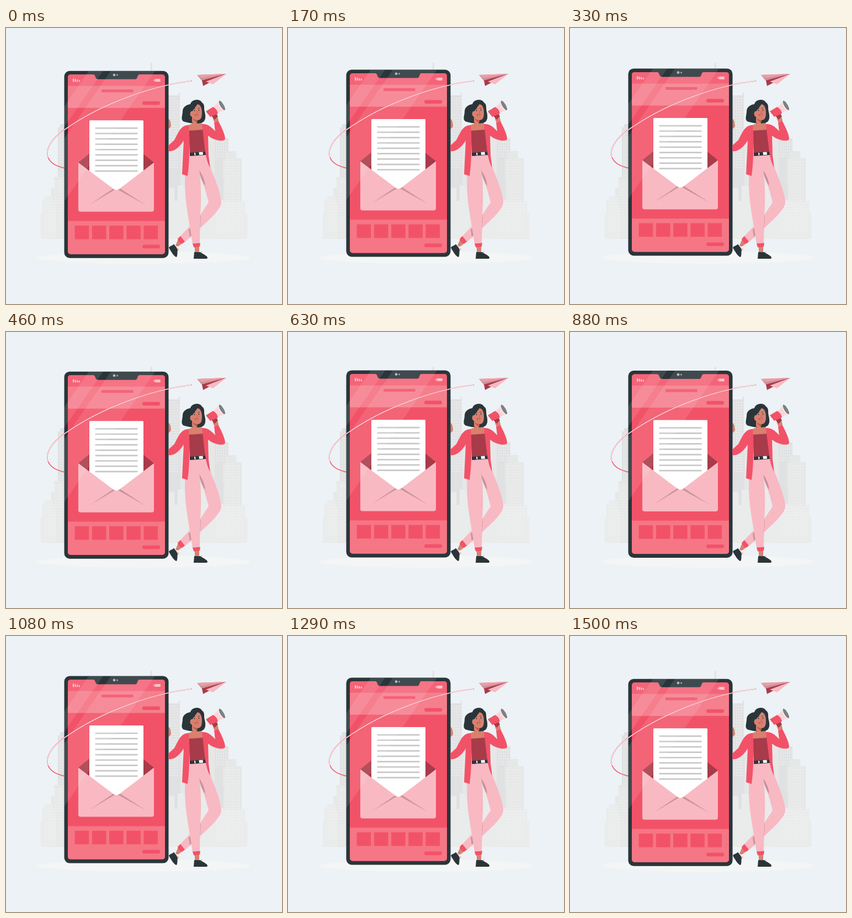
Recreate the animation shown at these times as an HTML page. Size 500 px wide and 500 px high, loop 1.54 s.

```html
<!DOCTYPE html>
<html lang="en">
<head>
<meta charset="utf-8">
<title>Newsletter</title>
<style>
html, body { margin: 0; height: 100%; overflow: hidden; background: #ecf2f5; }
svg { display: block; width: 100vw; height: 100vh; }
.red { fill: #f25268; }
.deep { fill: #a83b49; }
.pink { fill: #f8b9c2; }
.shade { fill: #c9939a; }
.dark { fill: #2a353a; }
.skin { fill: #d9806f; }
</style>
</head>
<body>
<svg viewBox="0 0 500 500">
  <defs>
    <pattern id="windows" width="4" height="5" patternUnits="userSpaceOnUse">
      <rect x="1" y="1" width="2" height="3" fill="#f2f2f2" opacity=".6"/>
    </pattern>
    <clipPath id="case"><rect x="105.5" y="78" width="189" height="339" rx="10"/></clipPath>
    <clipPath id="screen"><rect x="112" y="84.5" width="176" height="325.5" rx="5"/></clipPath>
  </defs>

  <ellipse cx="250" cy="416" rx="193" ry="11" fill="#f4f5f5"/>

  <g id="city">
    <path fill="#e0e1e2" d="M262 63h2.5v20h-2.5zM94 180h4v-6h8v130H94zM294 122h19v-5h2v66h63v17h25v112H294z"/>
    <path fill="#e6e7e7" d="M82 290h6v-20h18v112H82zM316 190h62v150h-62zM393 236h6v-13h18v13h10v146h-34z"/>
    <path fill="#eaebeb" d="M63 382v-46h3v-26h5v-5h15v10h4v67zM294 382V290h11v23h6v-28h67v29h55v22h4v46z"/>
    <path fill="#e0e1e2" d="M305 283h6v30h-6zM389 272h5v40h-5z"/>
    <path fill="url(#windows)" d="M96 182h10v88H96zM296 124h18v130h-18zM380 204h22v30h-22zM86 274h20v106H86zM397 238h28v90h-28zM70 310h18v60H70zM380 314h50v58h-50z"/>
  </g>

  <path class="skin" d="M290 164q7 0 8 6l1 8q-3 6-9 5z"/>
  <path fill="none" stroke="#f25268" stroke-width="1.5" d="M76 234C80 245 92 251 107 254"/>

  <g id="phone">
    <rect class="dark" x="105.5" y="78" width="189" height="339" rx="10"/>
    <g clip-path="url(#screen)">
      <path class="red" d="M112 84h176v327H112z"/>
      <path fill="#f46478" d="M112 84h176v21H112z"/>
      <path fill="#f57f8d" d="M112 105h176v40H112z"/>
      <path fill="#f57685" d="M112 349.8h176V411H112z"/>
    </g>
    <path class="dark" d="M158 84q3 1 4 5 1 4 5 4h67q3 0 4-4 1-4 4-5z"/>
    <g class="red">
      <rect x="173" y="111.5" width="57.5" height="5.2" rx="1"/>
      <rect x="247" y="133" width="32" height="6.5" rx="3.2"/>
      <rect x="247" y="393" width="32" height="6.5" rx="3.2"/>
      <g id="tiles"></g>
    </g>
    <path fill="#fac4cb" d="M121 92h2.3v5.7H121zM124.7 92.8h2.2v4.9h-2.2zM128.3 93.7h2.2v4h-2.2zM132 94.6h2v3.1h-2zM270 92.5h9.7v5H270zM267.3 93.7h2v2.6h-2z"/>

    <path class="deep" d="M131 244l26-21v42zM268 244l-26-21v42z"/>
    <path fill="#fff" d="M151 169q0-1.500 1.500-1.500h95q1.500 0 1.500 1.500v95l-49 34-49-34z"/>
    <g id="lines" fill="#c8c8c8"></g>
    <path class="pink" d="M131 244l64 48q5 3.500 10 0l63-48v85q0 4-4 4H135q-4 0-4-4z"/>
    <path class="shade" d="M152 320l42-28.500 3 1.700zM253 321l-50-27.800 4-2z"/>

    <path clip-path="url(#case)" fill="#fff" opacity=".1" d="M190 78h80L105 315V201zM150 78h26L105 180v-37z"/>
    <circle cx="196" cy="85.300" r="2.400" fill="#b4b8ba"/>
    <circle cx="201.500" cy="85.300" r="1.500" fill="#a4a9ab"/>
  </g>

  <g id="trail" fill="none">
    <path stroke="#f25268" stroke-width="1.600" d="M337 96C270 103 175 135 106 184 88 197 74 213 75 229q.3 3 2 7"/>
    <path stroke="#fbe6e9" stroke-width="1.200" d="M336 96.300C270 103 175 135 106.200 184.200 88 197 74 213 75.300 229q.3 3 1.500 6"/>
  </g>

  <g id="plane">
    <path class="shade" d="M346 85l53-2-44 13z"/>
    <path fill="#f59aa7" d="M346 85l53-2-45 7.500z"/>
    <path class="deep" d="M355 95l44-12-42 22z"/>
    <path class="pink" d="M399 83l-24 19-13-5z"/>
  </g>

  <g id="woman">
    <path class="skin" d="M314 378l8 10-9 7q-3 2-6-1z"/>
    <path class="dark" d="M304 391.500l7.500 9.500c-2 5 0 10-2.500 14-4 0-10-10-14-17 1-3 6-3 9-6.500z"/>
    <path class="pink" d="M309 398l5 2-2 4zM353 405l3 0-1 4z"/>
    <path class="pink" d="M344 230l18-2 4 12c7 22 22 52 24 74 1 14-19 31-66 74l-9-10 36-38 16-24q-7-30-19-60z"/>
    <path class="shade" d="M349 256q11 16 12 30-8-9-12-30zM353 338l-1 22-5 6zM331 365l5-4v14l-3 4z"/>
    <path class="red" d="M316 377l8 10-5 4q-7-3-8-9z"/>
    <path class="skin" d="M342 394h8v13h-8z"/>
    <path class="pink" d="M333 230l29-2-12 28c4 30 4 58 2 82l-1 52-13 1c-7-50-17-85-13-133z"/>
    <path class="red" d="M338 390.500l14-1-1 6.500-11 1.500z"/>
    <path class="dark" d="M341 406h11c5 4 12 6 13 10q0 2-3 2h-22z"/>

    <path class="skin" d="M337 162h17l1 11 5 14h-31l1-11 8-3z"/>
    <path class="deep" d="M331 186l29-2 3 43-30 2z"/>
    <path class="dark" d="M333 226l29-2v6l-29 2z"/>
    <path fill="#fff" d="M341 226l2 0 .5 4.500-2 0zM349.500 225l7-.5.5 5-7 .5z"/>
    <path class="red" d="M331 176c-14-1-19 14-26 27l-11 10v10c12 2 21-9 28-19l-3 61 10 3c3-20 5-62 2-92z"/>
    <path class="red" d="M355 174c10-1 17 5 24 13l-2-16 7-4c7 14 13 26 13 34-2 6-20 3-31-6l1 36 3 22q-6-9-9-28z"/>
    <path class="skin" d="M374 159q5-4 9 1l2 8-7 4-3-7z"/>

    <path class="dark" d="M334 138c2-9 17-11 21-3 6 4 3 10 5 17 2 8 2 16-4 19-10 4-27 1-35-2-5-4-1-11-1-18 0-8 7-12 14-13z"/>
    <path class="skin" d="M337 151c3-3 6-8 10-13 6 1 8 8 8 16 0 8-2 13-8 13l-2 8q-6 0-8-5v-9q-5-3-3-8 1-3 3-2z"/>
    <path fill="#b95d50" d="M338 163q4 4 9 4l-1 4q-6-2-8-8z"/>
    <circle class="dark" cx="341.500" cy="149.500" r="1"/>
    <circle class="dark" cx="349.500" cy="149" r="1"/>
    <path fill="none" stroke="#2a353a" d="M338.500 147q2-2 4-1.500M347.500 145.500q2-1 3 .5"/>
    <path fill="none" stroke="#b95d50" stroke-width=".8" d="M346 150l1.500 4-2 .5"/>
    <path fill="#fff" stroke="#8d3038" stroke-width=".8" d="M342 157q3 1 6-.5-1 5-6 .5z"/>

    <path class="deep" d="M372 159l9-4 3 5-6 6z"/>
    <path fill="#fbd5da" d="M375 143q8-4 10-12l12 19q-7 0-13 4z"/>
    <path class="red" d="M362 151l13-8q7 3 9 12l-14 6z"/>
    <ellipse cx="391" cy="140.500" rx="11" ry="4" fill="#fff" transform="rotate(59 391 140.500)"/>
    <ellipse cx="391.300" cy="140.300" rx="10" ry="3.200" fill="#7b8185" transform="rotate(59 391.300 140.300)"/>
  </g>
</svg>
<script>
const byId = id => document.getElementById(id);
const rects = (id, count, make) => {
  byId(id).innerHTML = Array.from({ length: count }, (_, i) => {
    const [x, y, w, h, r] = make(i);
    return `<rect x="${x}" y="${y}" width="${w}" height="${h}" rx="${r}"/>`;
  }).join('');
};
rects('tiles', 5, i => [124.7 + 31.2 * i, 358.2, 25.6, 24.6, 0]);
rects('lines', 9, i => [161.5, 180.3 + 9.7 * i, 77, 2.7, 0.5]);

const LOOP = 1540, FLOAT = 1500, LEAD = 15, RISE = 10;
const phone = byId('phone');

// Linear rise and fall, as a triangle wave
function draw() {
  const phase = (performance.now() % LOOP + LEAD) % FLOAT / FLOAT;
  const lift = RISE * (1 - Math.abs(1 - 2 * phase));
  phone.setAttribute('transform', `translate(0 ${-lift})`);
  requestAnimationFrame(draw);
}
draw();
</script>
</body>
</html>
```
